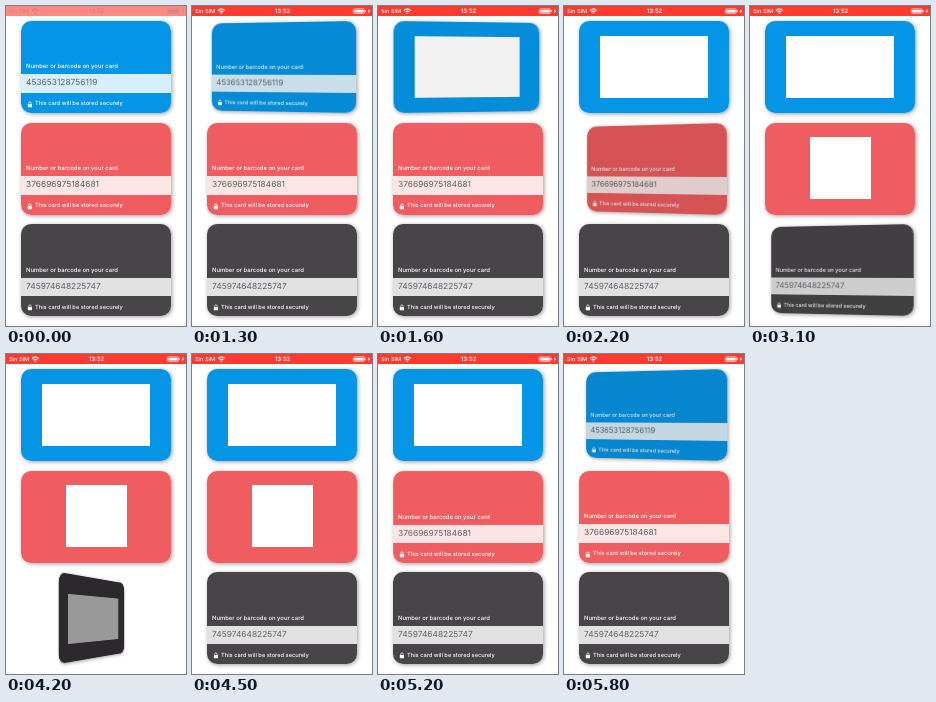
Recreate the animation shown at these times as an HTML page. Size 180x320 px, loop 5.9 s.

```html
<!DOCTYPE html>
<html lang="en">
<head>
<meta charset="utf-8">
<style>
  html, body { margin: 0; width: 100%; height: 100%; overflow: hidden; background: #fff; }
  #stage { position: relative; width: 180px; height: 320px; overflow: hidden; background: #fff;
    font-family: Inter, Roboto, sans-serif; white-space: nowrap; text-rendering: geometricPrecision; }
  #bar { position: absolute; inset: 0 0 auto; display: block; }
  .card { position: absolute; left: 15px; width: 150px; height: 92px; border-radius: 10px;
    box-shadow: 1px 1px 4px rgba(0, 0, 0, .38); }
  .face { position: absolute; inset: 0; border-radius: 10px; overflow: hidden; color: #fff; }
  .face > * { position: absolute; }
  .label { left: 5px; top: 42.5px; font-size: 5.9px; font-weight: 500; line-height: 8px; }
  .strip { left: 0; right: 0; top: 53.5px; height: 18.5px; padding-left: 5px;
    background: rgba(255, 255, 255, .84); color: #626468; font-size: 8.4px; line-height: 18.5px; }
  .note { left: 14px; top: 79.5px; font-size: 5.7px; font-weight: 500; line-height: 8px; }
  .lock { left: 6px; top: 80px; }
  .panel { background: #fff; }
</style>
</head>
<body>
<div id="stage">
  <svg id="bar" width="180" height="10" viewBox="0 0 180 10">
    <rect id="fill" width="180" height="10"/>
    <g id="ink" font-family="Inter, Roboto, sans-serif" font-size="5.6">
      <text x="3" y="7.2" font-weight="500">Sin SIM</text>
      <text x="90.5" y="7.2" font-size="6" font-weight="600" text-anchor="middle">13:52</text>
      <g fill="none" stroke="currentColor" stroke-width="1.1">
        <path d="M26 4.5Q29.3 1.3 32.6 4.5M27.4 6Q29.3 4.2 31.2 6"/>
      </g>
      <circle cx="29.3" cy="7.2" r=".8"/>
      <rect x="161.3" y="2.8" width="11.2" height="4.6" rx="1.1" fill="none" stroke="currentColor" stroke-width=".6"/>
      <rect x="162.2" y="3.7" width="9.4" height="2.8" rx=".5"/>
      <rect x="173.2" y="4.2" width=".8" height="1.8" rx=".4"/>
      <path d="M177.4 2.6L175.6 5.5H176.8L176.2 7.8L178.2 4.7H177Z"/>
    </g>
  </svg>
</div>
<script>
const LOOP = 5900, STEP = 100, FLIP = 400, DEPTH = 400, HALF = 75;

// panel: left, top, width, height; there and back: flip start times
const cards = [
  { top: 14.9, color: '#0595e6', digits: '453653128756119', panel: [21, 15, 108, 62], there: 1247, back: 5464 },
  { top: 116.5, color: '#f05d60', digits: '376696975184681', panel: [44.5, 14, 61, 62.5], there: 2132, back: 4810 },
  { top: 218.1, color: '#474547', digits: '745974648225747', panel: [17, 20.5, 116, 52], there: 3040, back: 4045 }
];

const stage = document.getElementById('stage');
const fill = document.getElementById('fill');
const ink = document.getElementById('ink');

function build(card) {
  const [x, y, w, h] = card.panel;
  const el = document.createElement('div');
  el.className = 'card';
  el.style.top = card.top + 'px';
  el.innerHTML = `
    <div class="face" style="background:${card.color}">
      <div class="label">Number or barcode on your card</div>
      <div class="strip">${card.digits}</div>
      <svg class="lock" width="6" height="7" viewBox="0 0 6 7">
        <rect x=".8" y="3" width="4.2" height="3.2" rx=".5" fill="#fff"/>
        <path d="M1.7 3V2.1a1.2 1.2 0 0 1 2.4 0V3" fill="none" stroke="#fff" stroke-width=".7"/>
      </svg>
      <div class="note">This card will be stored securely</div>
    </div>
    <div class="face" style="background:${card.color}">
      <div class="panel" style="left:${x}px;top:${y}px;width:${w}px;height:${h}px"></div>
    </div>`;
  stage.append(el);
  card.el = el;
  [card.front, card.rear] = el.children;
}

const clamp = v => Math.min(1, Math.max(0, v));
const ease = p => p * p * (3 - 2 * p);
const mix = (a, b, p) => `rgb(${a.map((v, i) => Math.round(v + (b[i] - v) * p))})`;

function drawCard(card, t) {
  const turn = ease(clamp((t - card.there) / FLIP)) - ease(clamp((t - card.back) / FLIP));
  const angle = turn * 180;
  const lean = Math.sin(turn * Math.PI);
  const rear = angle >= 90;
  card.front.style.visibility = rear ? 'hidden' : 'visible';
  card.rear.style.visibility = rear ? 'visible' : 'hidden';
  // pushed back so that the near edge stays in the screen plane
  const moving = turn > 0 && turn < 1;
  card.el.style.transform = moving
    ? `perspective(${DEPTH}px) translateZ(${-HALF * lean}px) rotateY(${(rear ? 180 : 0) - angle}deg)`
    : 'none';
  card.el.style.filter = moving ? `brightness(${1 - 0.46 * lean})` : 'none';
}

function draw(now) {
  const t = Math.floor((now % LOOP) / STEP) * STEP;
  const fade = clamp(t / 400);
  const tone = mix([205, 132, 130], [255, 255, 255], fade);
  fill.setAttribute('fill', mix([255, 136, 131], [255, 59, 48], fade));
  ink.setAttribute('fill', tone);
  ink.style.color = tone;
  cards.forEach(card => drawCard(card, t));
}

cards.forEach(build);
const start = performance.now();
function tick() {
  draw(performance.now() - start);
  requestAnimationFrame(tick);
}
tick();
</script>
</body>
</html>
```
